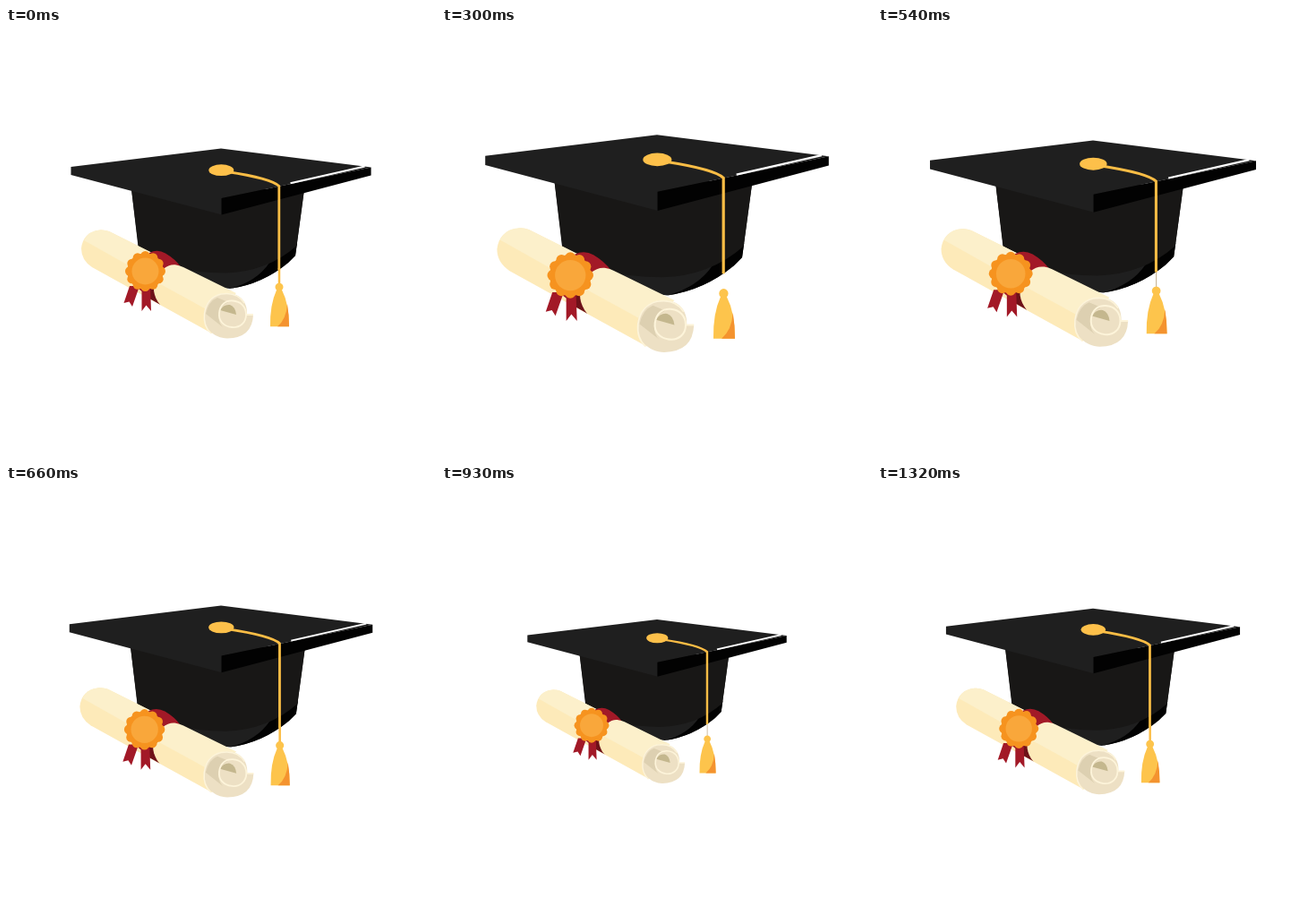
Recreate the animation shown at these times as an HTML page. Size 480 by 480 pixels, loop 1.35 s.

```html
<!DOCTYPE html>
<html lang="en">
<head>
<meta charset="utf-8">
<title>Graduation cap</title>
<style>
html, body { margin: 0; width: 100%; height: 100%; overflow: hidden; background: #fff; }
svg { display: block; width: 100%; height: 100%; }
</style>
</head>
<body>
<svg viewBox="0 0 480 480">
  <g id="art">
    <!-- cap body -->
    <path fill="#1f1f1f" d="M140 180L148 245Q150 262 185 276Q220 289 250 291Q286 286 315 262L323 254L333 180Z"/>
    <path fill="#020202" d="M250 291Q286 286 315 262L323 254L325 240L294 262Q280 283 250 291Z"/>
    <path fill="#181716" d="M140 180L148 248Q180 273 245 273.500Q292 272 324.500 243L333 180Z"/>
    <!-- board -->
    <path fill="#1f1f1f" d="M72.500 155L240 134.500L407.500 155.500L241 190V208.500L72.500 164Z"/>
    <path fill="#020202" d="M240.500 190L407.500 155.500V164.500L240.500 208.500Z"/>
    <path fill="none" stroke="#fff" stroke-width="2" d="M317.500 173.300L400.500 154.500"/>
    <!-- tassel -->
    <path id="thin" fill="none" stroke="#b9a27c" stroke-width=".8" d="M305 268V286"/>
    <path id="thick" fill="none" stroke="#fbbd45" stroke-width="2.500" d="M305 268V286"/>
    <path fill="none" stroke="#fbbd45" stroke-width="2.800" d="M247 160.500Q296 168 304.800 176.500V270"/>
    <ellipse cx="240.300" cy="158.700" rx="14" ry="6.400" fill="#fdc04a"/>
    <path fill="#fdc44c" d="M302 292.500A4.500 4.500 0 1 1 308 292.500Q316 308 316 333.200H295Q294.500 309 302 292.500Z"/>
    <path fill="#f4932f" d="M314 308Q316 320 316 333.200H303Q313 325 314 308Z"/>
    <!-- scroll, left part -->
    <path fill="#fdeab9" d="M115 227L190 264.500L172 309L96 267Q84 259 84 246Q86 228 105 225.500Q110 225 115 227Z"/>
    <path fill="#fcf0cb" d="M115 227L190 264.500L175 286.500L87 237Q92 226 105 225.500Q110 225 115 227Z"/>
    <!-- ribbon -->
    <path fill="#a21927" d="M160 251Q169 246.500 178 251.500Q189 258 195 266.500L186 272L170 288L158 290Z"/>
    <path fill="#6e1118" d="M158 288L167 290L172.500 309L160 302Z"/>
    <path fill="#a21927" d="M138 288L131.500 307L137.500 305.500L141 311L148 291L151.500 294L151.500 316L156.500 309.500L162 316L161 288Z"/>
    <!-- scroll, right part -->
    <path fill="#fdeab9" d="M172 309C164 299 163 288 168 281L231 318L230 341Z"/>
    <path fill="#fcf0cb" d="M167 283C171 270 181 263 190 264.500Q194 265 198 267L257 296L231 318Z"/>
    <g id="medal" fill="#f6931f"></g>
    <circle cx="155.500" cy="271.500" r="15" fill="#f9a73b"/>
    <!-- rolled end -->
    <path fill="#ede0c4" d="M247 296C262 296 270 307 269 320H276Q275 346 247 346.500C232 346 221 335 221 321C221 307 232 296 247 296Z"/>
    <path fill="#ddd0b1" d="M223 319Q226 305 236 301L248 306Q238 311 237.500 321Q237 329 242 334Z"/>
    <path fill="#c4b78e" d="M239 315Q243 308 250 309Q256 311 257 320Z"/>
    <path fill="none" stroke="#fdf4da" stroke-width="1.800" d="M276 320H268C268 329 261 335 252 334C243 333 237 327 238 318C239 309 245 304 253 304.500C262 305 268 311 268 320"/>
    <path fill="none" stroke="#fdf4da" stroke-width="1.500" d="M229 341Q220 333 221.500 319Q224 301 240 297Q258 294 266 307"/>
  </g>
</svg>
<script>
const $ = id => document.getElementById(id);
const LOOP = 1350, STEP = 30, MID = 240;

// scalloped rosette
const bumps = 12;
let rosette = '<circle cx="155.5" cy="271.5" r="20.3"/>';
for (let i = 0; i < bumps; i++) {
  const a = i / bumps * 2 * Math.PI;
  const x = 155.5 + 17.3 * Math.cos(a), y = 271.5 + 17.3 * Math.sin(a);
  rosette += `<circle cx="${x.toFixed(2)}" cy="${y.toFixed(2)}" r="5.2"/>`;
}
$('medal').innerHTML = rosette;

function draw(ms) {
  const t = Math.floor((ms % LOOP) / STEP) * STEP;
  const s = 1 + 0.147 * Math.sin(2 * Math.PI * t / LOOP);
  $('art').setAttribute('transform', `translate(${MID} ${MID}) scale(${s}) translate(${-MID} ${-MID})`);
  // the lowest bit of cord thins out as the size changes
  $('thick').style.opacity = Math.abs(s - 1) < 0.06 ? 1 : 0;
  $('thin').style.opacity = s < 1.12 ? 1 : 0;
}

let start;
function tick(now) {
  start ??= now;
  draw(now - start);
  requestAnimationFrame(tick);
}
draw(0);
requestAnimationFrame(tick);
</script>
</body>
</html>
```
